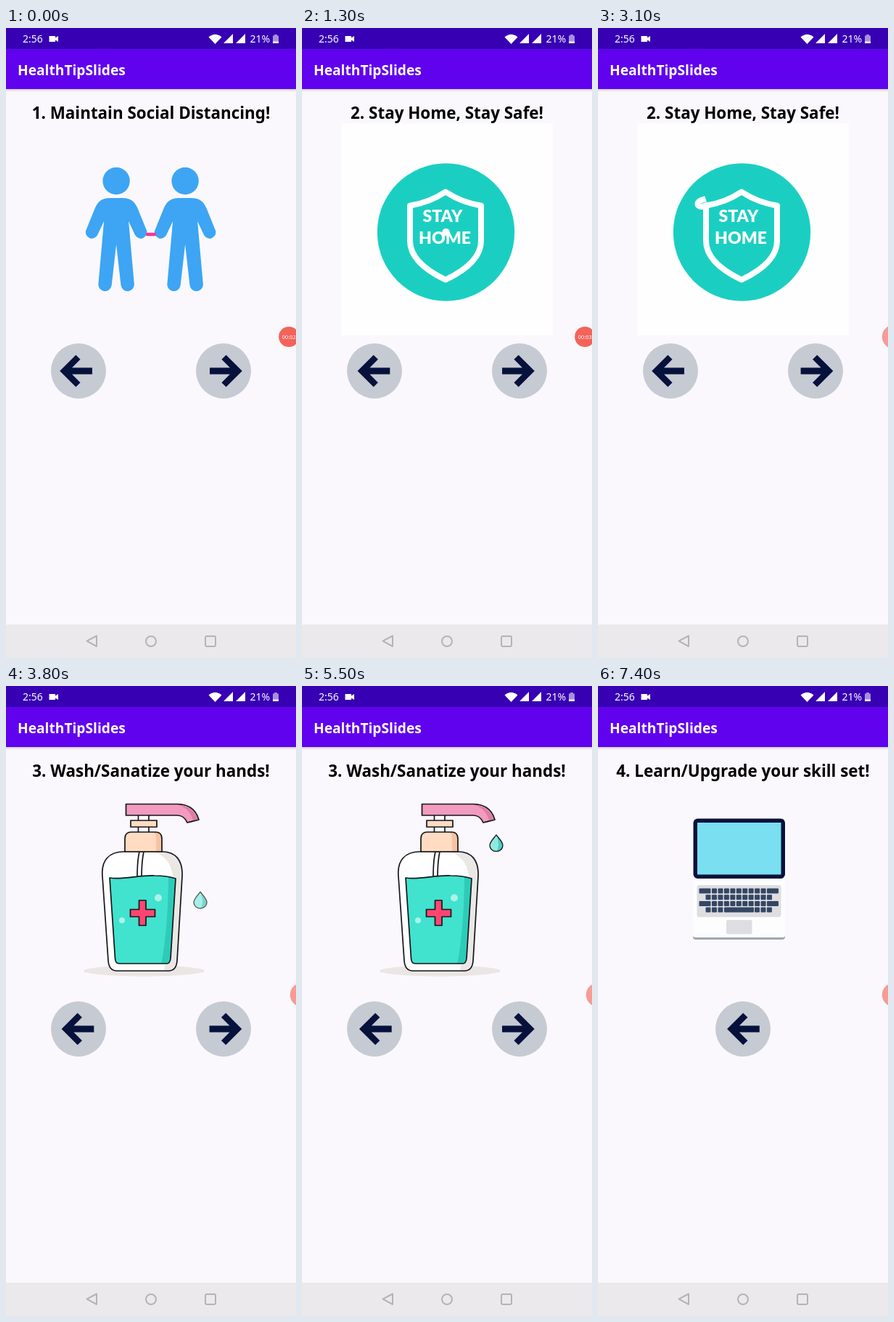
Recreate the animation shown at these times as an HTML page. Size 400 by 867 pixels, loop 7500 ms.

```html
<!DOCTYPE html>
<html lang="en">
<head>
<meta charset="utf-8">
<title>Health tips</title>
<style>
html, body { margin: 0; width: 100%; height: 100%; overflow: hidden; background: #faf8fc; }
svg { display: block; width: 400px; height: 867px; font-family: "Noto Sans", "Open Sans", sans-serif; }
.heading { font-size: 22.4px; font-weight: 600; text-anchor: middle; }
.badge { font: 900 23px Lato, sans-serif; text-anchor: middle; }
.ink { stroke: #15151c; stroke-width: 1.7; stroke-linejoin: round; }
</style>
</head>
<body>
<svg viewBox="0 0 400 867">
  <defs>
    <linearGradient id="shade" x2="0" y2="1">
      <stop stop-color="#000" stop-opacity=".16"/><stop offset="1" stop-color="#000" stop-opacity="0"/>
    </linearGradient>
    <path id="person" d="M-9-43H9C20-43 25-38 29-30L42 2A8.6 8.6 0 0 1 26 8L17-11L24.7 75A9.2 9.2 0 0 1 6.4 77L0 21L-6.4 77A9.2 9.2 0 0 1-24.7 75L-17-11L-26 8A8.6 8.6 0 0 1-42 2L-29-30C-25-38-20-43-9-43ZM-18.7-66.5a18.7 18.7 0 0 1 37.4 0a18.7 18.7 0 0 1-37.4 0Z"/>
    <path id="shield" d="M198 225.5Q176 240 149 244.5V293C149 318 176 336 198 346.5C220 336 247 318 247 293V244.5Q220 240 198 225.5Z"/>
    <path id="dropShape" d="M0-11.500C4-6 9-2 9 3A9 8.300 0 0 1-9 3C-9-2-4-6 0-11.500Z"/>
    <g id="arrow" fill="none" stroke="#06113c" stroke-width="8.8">
      <path d="M3-19L-16 0L3 19M-15 0H22.5"/>
    </g>
    <clipPath id="shieldClip"><use href="#shield"/></clipPath>
    <clipPath id="whiteClip"><circle id="whiteDisc" cx="198.5" cy="281"/></clipPath>
    <clipPath id="lidClip"><rect x="131" y="265" width="127" height="82" rx="4"/></clipPath>
    <clipPath id="bodyClip"><path id="body" d="M163 228H215C235 228 244 241 243 262L236 378Q235 392 224 392H153Q142 392 141 378L133 262C131 240 142 228 163 228Z"/></clipPath>
    <clipPath id="liquidClip"><path id="liquid" d="M143 264C160 267 185 260 205 261C218 261 228 263 234 265L227 375Q226 382 222 382H156Q151 382 150.5 375Z"/></clipPath>
  </defs>

  <rect width="400" height="867" fill="#faf8fc"/>
  <rect y="84" width="400" height="4" fill="url(#shade)"/>
  <rect width="400" height="84" fill="#6002ee"/>
  <rect width="400" height="29" fill="#3700b3"/>
  <g fill="#fff">
    <g font-size="14"><text x="23" y="20">2:56</text><text x="336.5" y="20">21%</text></g>
    <path d="M59.500 11h8.500v2.500l4-2.500v8l-4-2.500v2.500h-8.500zM279.500 12.500Q288.500 5 297.500 12.500L288.500 22ZM313 8V21H300ZM330 8V21H317Z"/>
    <path d="M370 9h4v1.500h2v10.500h-8v-10.500h2z" fill="#a98ee0"/><path d="M368 18.500h8v2.500h-8z"/>
    <text x="16" y="64.500" font-size="19.200" font-weight="600">HealthTipSlides</text>
  </g>
  <text id="heading" class="heading" x="200" y="125"/>

  <g id="distance">
    <use id="personA" href="#person" fill="#3da5f4"/>
    <use id="personB" href="#person" fill="#3da5f4"/>
    <g fill="none" stroke="#f83493">
      <path id="span" stroke-width="4.600" stroke-linecap="round" stroke-linejoin="round"/>
      <path id="metres" stroke-width="13" d="M163 231V225C163 211 180.500 211 180.500 225C180.500 240 163 254 163 270.500H187M199.500 277V227M199.500 241C201 230 218 229 218 241V277M218 241C220 230 236.500 229 236.500 241V277"/>
    </g>
  </g>

  <g id="home">
    <rect x="54" y="131" width="292" height="292" fill="#fefefe"/>
    <circle cx="198.500" cy="281" r="94.700" fill="#1acfc2"/>
    <g fill="none" stroke="#fff" stroke-width="8" stroke-linejoin="round">
      <use href="#shield"/>
      <path id="curl" d="M148.500 235L144 236.500C135.500 238 135.500 246 143 246L152 243"/>
    </g>
    <g class="badge" fill="#fff"><text x="194" y="267">STAY</text><text x="197" y="297">HOME</text></g>
    <g clip-path="url(#whiteClip)">
      <circle cx="198.500" cy="281" r="96" fill="#fefefe"/>
      <use href="#shield" fill="none" stroke="#1acfc2" stroke-width="8" stroke-linejoin="round"/>
      <g clip-path="url(#shieldClip)">
        <g id="safe" class="badge" fill="#1acfc2"><text y="267">STAY</text><text y="297">SAFE</text></g>
      </g>
    </g>
  </g>

  <g id="wash">
    <ellipse cx="190.500" cy="392" rx="83.500" ry="7.500" fill="#e9e6e4"/>
    <use href="#body" fill="#fff"/>
    <path d="M205 228H246V392H218Q232 310 230 262Q228 238 205 228Z" fill="#eae7e5" clip-path="url(#bodyClip)"/>
    <path d="M181 264Q181 240 184 228H190Q187 242 187 264" fill="#fff" class="ink"/>
    <g clip-path="url(#liquidClip)">
      <use href="#liquid" fill="#41e2ce"/>
      <path d="M224 258H240V384H214Q224 330 224 258Z" fill="#2ecbb9"/>
    </g>
    <use href="#liquid" class="ink" fill="none"/>
    <use href="#body" class="ink" fill="none"/>
    <g fill="#aaf3e8"><circle cx="210" cy="291.500" r="5"/><circle cx="160" cy="322.500" r="4"/></g>
    <path d="M183.500 295H193V307.500H205.500V317.500H193V329.500H183.500V317.500H171.500V307.500H183.500Z" fill="#fd4670" class="ink"/>
    <path d="M182.500 176V202H197V176" fill="#fff" class="ink"/>
    <path d="M164 228V210Q164 201 173 201H206Q215 201 215 210V228Z" fill="#ffdcc1"/>
    <path d="M203 201H206Q215 201 215 210V228H207V210Q207 204 203 201Z" fill="#f7c3a2"/>
    <path d="M164 228V210Q164 201 173 201H206Q215 201 215 210V228Z" fill="none" class="ink"/>
    <rect x="172" y="185" width="36" height="9" fill="#ffdcc1" class="ink"/>
    <g id="pump">
      <path d="M165.500 162.500H236C252 162.500 262 170 266 184L250 188C247 181 242 178 236 178H165.500Z" fill="#f29bbe" class="ink"/>
      <path d="M238 164Q258 165 264 183L258 185Q253 168 238 164Z" fill="#dc7ea6"/>
    </g>
    <g id="drop">
      <use href="#dropShape" fill="#8eeae0"/>
      <path d="M0-11.500C4-6 9-2 9 3A9 8.300 0 0 1 0 11.300Q6 4 0-11.500Z" fill="#4fcdc2"/>
      <use href="#dropShape" fill="none" class="ink" style="stroke-width:1.300"/>
    </g>
  </g>

  <g id="learn">
    <rect x="131" y="265" width="127" height="84" rx="4" fill="#a0a6b2"/>
    <rect x="131" y="265" width="127" height="81" rx="3" fill="#fdfdfe"/>
    <rect x="136.500" y="274" width="116" height="44" rx="3" fill="#dedee2"/>
    <rect x="177" y="322" width="35.500" height="19.500" rx="2" fill="#dedee2"/>
    <g id="keys" fill="#344663"/>
    <g id="lid" clip-path="url(#lidClip)">
      <path d="M131 265H258V346H131Z" fill="#f2f1f5"/>
      <circle cx="197" cy="307" r="8" fill="#bfc1c8"/>
      <path id="shine" d="M229 265H251L155 346H133Z" fill="#fefefe"/>
    </g>
    <g id="screen">
      <rect x="131.500" y="182.500" width="126.500" height="82.500" rx="6" fill="#06113c"/>
      <rect x="137" y="188" width="115.500" height="71.500" fill="#7adff0"/>
    </g>
  </g>

  <g id="back"><circle cx="100" cy="472" r="38" fill="#c6cad2"/><use id="backArrow" href="#arrow"/></g>
  <g id="next"><circle cx="300" cy="472" r="38" fill="#c6cad2"/><use id="nextArrow" href="#arrow"/></g>

  <g id="bubble">
    <circle id="bubbleDisc" fill="#f4635a"/>
    <text id="timer" y="2.700" font-size="7.400" fill="#fff" text-anchor="middle"/>
  </g>

  <rect y="821" width="400" height="46" fill="#ebe9eb"/>
  <g fill="none" stroke="#b5b3b6" stroke-width="2" stroke-linejoin="round">
    <path d="M125 836.500V851L111.500 843.700Z"/><circle cx="200" cy="844" r="7"/>
    <rect x="275" y="837" width="14" height="14" rx="2"/>
  </g>
</svg>
<script>
const LOOP = 7500, STEP = 100;
const SCENES = [
  { id: "distance", start: 0, heading: "1. Maintain Social Distancing!" },
  { id: "home", start: 1200, heading: "2. Stay Home, Stay Safe!" },
  { id: "wash", start: 3400, heading: "3. Wash/Sanatize your hands!" },
  { id: "learn", start: 5800, heading: "4. Learn/Upgrade your skill set!" }
];

const $ = id => document.getElementById(id);
const set = (id, attrs) => { for (const k in attrs) $(id).setAttribute(k, attrs[k]); };
const move = (id, transform) => set(id, { transform });
const show = (id, on) => { $(id).style.display = on ? "" : "none"; };
const mix = (a, b, p) => a + (b - a) * p;
const ramp = (t, from, to) => Math.min(1, Math.max(0, (t - from) / (to - from)));
const ease = (t, from, to) => { const p = ramp(t, from, to); return p * p * (3 - 2 * p); };
const wave = (t, phase) => Math.cos(2 * Math.PI * (t / 1000 + phase));

function buildKeys() {
  const key = (x, y, w) => `<rect x="${x}" y="${y}" width="${w}" height="7" rx="1"/>`;
  const small = (y, count, x = 148.5) => {
    let out = "";
    for (let i = 0; i < count; i++) out += key(x + i * 8.45, y, 7);
    return out;
  };
  const wide = y => key(139.5, y, 16) + small(y, 9, 157) + key(233, y, 16);
  $("keys").innerHTML = wide(278.5) + small(287.2, 11) + wide(295.9) +
    small(304.6, 3) + key(174, 304.6, 41) + small(304.6, 3, 216);
}

const draw = {
  distance(t) {
    const p = ease(t, 0, 450);
    const half = mix(5, 75.5, p), head = 13 * p;
    const left = 200 - half, right = 200 + half, y = mix(284, 281, p);
    const gap = mix(47.5, 106.3, p), size = mix(1, 0.535, p);
    move("personA", `translate(${199.6 - gap} 277) scale(${size})`);
    move("personB", `translate(${199.6 + gap} 277) scale(${size})`);
    set("span", { d: `M${left} 284Q200 ${mix(284, 286, p)} ${right} ${y}` +
      `M${left + head} ${284 - head * 0.85}L${left} 284L${left + head} ${284 + head * 0.75}` +
      `M${right - head} ${y - head * 0.75}L${right} ${y}L${right - head} ${y + head * 0.75}` });
    move("metres", `translate(200 277) scale(${ease(t, 200, 500)}) translate(-200 -277)`);
  },
  home(t) {
    const cover = ease(t, 1250, 1600) * (1 - ease(t, 2450, 2800));
    set("whiteDisc", { r: 94.6 * cover });
    const x = 197 + 75 * (1 - ease(t, 1600, 2000)) + 105 * ramp(t, 2150, 2550) ** 2;
    move("safe", `translate(${x} 0)`);
    show("curl", t >= 3100);
  },
  wash(t) {
    const s = (t - 3250) % 1000;
    move("pump", `translate(0 ${6 * Math.sin(Math.PI * ramp(s, 600, 1000))})`);
    move("drop", `translate(268 ${196 + 40 * (s / 350) ** 2}) scale(${ramp(s, 0, 250)})`);
    set("drop", { opacity: 1 - ramp(s, 500, 700) });
  },
  learn(t) {
    const size = ease(t, 5700, 6050);
    move("learn", `translate(194.5 307) scale(${size}) translate(-194.5 -307)`);
    const lift = Math.cos(Math.PI * ease(t, 6450, 7100));
    const hinge = k => `translate(0 265) scale(1 ${k}) translate(0 -265)`;
    move("lid", hinge(Math.max(0, lift)));
    move("screen", hinge(Math.max(0, -lift)));
    show("lid", lift > 0);
    show("screen", lift < 0);
    move("shine", `translate(${(t - 6300) * 0.6} 0)`);
  }
};

function drawBubble(t) {
  const hide = ramp(t, 2100, 2500), fade = ramp(t, 2200, 2700);
  move("bubble", `translate(${mix(390.2, 408, hide)} 425)`);
  set("bubbleDisc", { r: mix(14, 16.2, ramp(t, 2000, 2300)), opacity: mix(1, 0.62, fade) });
  $("timer").textContent = "00:0" + (t < 500 ? 2 : t < 1500 ? 3 : 4);
  show("timer", t < 2500);
}

function render(t) {
  const scene = SCENES.filter(s => t >= s.start).pop();
  SCENES.forEach(s => show(s.id, s === scene));
  $("heading").textContent = scene.heading;
  draw[scene.id](t);

  const last = scene.id === "learn";
  show("next", !last);
  move("back", `translate(${last ? 100 : 0} 0)`);
  move("backArrow", `translate(${100 - 1.2 - 2.5 * wave(t, -0.05)} 472)`);
  move("nextArrow", `translate(${300 + Math.max(-1.5, 0.8 + 3.1 * wave(t, 0.08))} 472) scale(-1 1)`);
  drawBubble(t);
}

buildKeys();
const began = performance.now();
function tick() {
  const t = (performance.now() - began) % LOOP;
  render(Math.floor(t / STEP) * STEP);
  requestAnimationFrame(tick);
}
tick();
</script>
</body>
</html>
```
